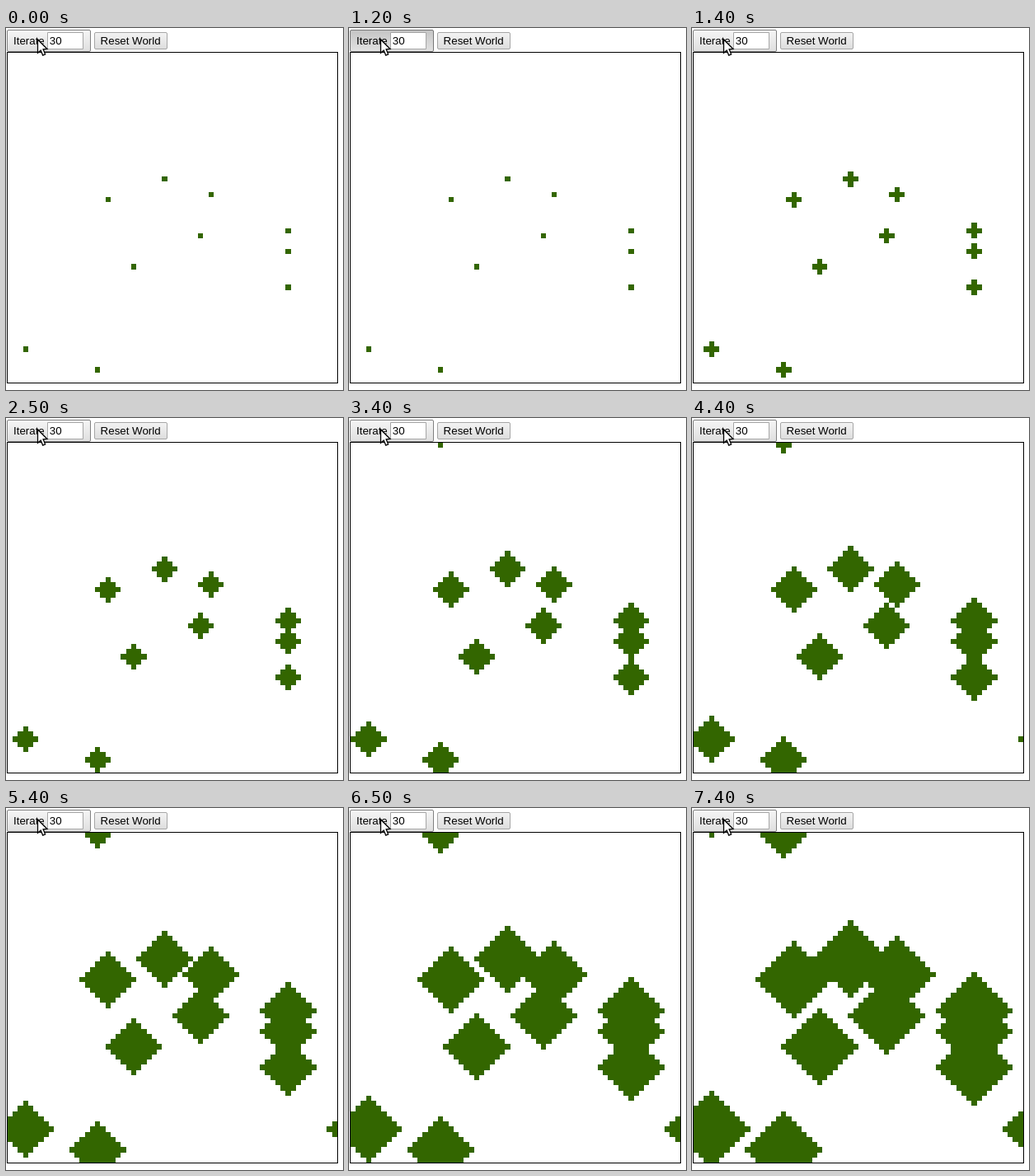
These frames come from a looping animation (409 by 439 pixels, 8000 ms). An HTML page with a canvas:

```html
<!DOCTYPE html>
<html>
<head>
<meta charset="utf-8">
<style>
html, body { margin: 0; width: 100%; height: 100%; overflow: hidden; background: #fff; }
canvas { display: block; }
</style>
</head>
<body>
<canvas id="stage" width="409" height="439"></canvas>
<script>
const ctx = document.getElementById('stage').getContext('2d');
const LOOP = 8000, PRESS = 1200, RELEASE = 1300, FIRST_GROWTH = 1400;
const GRID = 64, CELL = 400 / GRID, LEFT = 2, TOP = 30;
const GREEN = '#336600';
// Column and row of each starting plant.
const seeds = [[30, 24], [19, 28], [39, 27], [37, 35], [24, 41],
               [54, 34], [54, 38], [54, 45], [3, 57], [17, 61]];

// One growth step per second; every fourth lands a tenth late.
const growthTime = step => FIRST_GROWTH + step * 1000 + (step % 4 === 1 ? 100 : 0);

function radiusAt(t) {
  let radius = 0;
  while (t >= growthTime(radius)) radius++;
  return radius;
}

// Cell edges snap to whole pixels: halves go left in x and down in y.
const edgeX = col => Math.ceil(LEFT + col * CELL - 0.5);
const edgeY = row => Math.floor(TOP + row * CELL + 0.5);
const wrap = n => (n + GRID) % GRID;

function drawCell(col, row) {
  const x = edgeX(col), y = edgeY(row);
  ctx.fillRect(x, y, edgeX(col + 1) - x, edgeY(row + 1) - y);
}

function drawWorld(radius) {
  ctx.strokeStyle = '#000';
  ctx.lineWidth = 1;
  ctx.strokeRect(1.5, 29.5, 401, 401);
  ctx.fillStyle = GREEN;
  for (const [col, row] of seeds) {
    for (let dy = -radius; dy <= radius; dy++) {
      const half = radius - Math.abs(dy);
      for (let dx = -half; dx <= half; dx++) drawCell(wrap(col + dx), wrap(row + dy));
    }
  }
}

function drawBox(x, y, w, h, border, top, bottom, corner = 0) {
  const fill = ctx.createLinearGradient(0, y, 0, y + h);
  fill.addColorStop(0, top);
  fill.addColorStop(1, bottom);
  ctx.beginPath();
  ctx.roundRect(x + 0.5, y + 0.5, w - 1, h - 1, corner);
  ctx.fillStyle = fill;
  ctx.fill();
  ctx.strokeStyle = border;
  ctx.lineWidth = 1;
  ctx.stroke();
}

function drawText(text, x) {
  ctx.fillStyle = '#000';
  ctx.font = '13.333px "Liberation Sans", Arial, sans-serif';
  ctx.fillText(text, x, 20);
}

function drawControls(pressed) {
  if (pressed) drawBox(1, 2, 102, 27, '#777', '#c4c4c4', '#e2e2e2', 1.5);
  else drawBox(1, 2, 102, 27, '#808080', '#f6f6f6', '#dedede', 1.5);
  drawText('Iterate', 9);
  drawBox(50, 5, 44, 21, '#a6a6a6', '#fff', '#fff');
  drawText('30', 52.8);
  drawBox(107, 5, 89, 21, '#a6a6a6', '#f4f4f4', '#dcdcdc', 1.5);
  drawText('Reset World', 114.6);
}

// An arrow symmetric about its own axis, tilted so its left edge is upright.
function drawPointer() {
  const side = [[6.2, 15], [1.6, 13.4], [1.6, 20]];
  const mirrored = side.map(([x, y]) => [-x, y]).reverse();
  ctx.save();
  ctx.translate(38.5, 14);
  ctx.rotate(-Math.PI / 8);
  ctx.beginPath();
  ctx.moveTo(0, 0);
  for (const [x, y] of [...side, ...mirrored]) ctx.lineTo(x, y);
  ctx.closePath();
  ctx.fillStyle = '#fff';
  ctx.fill();
  ctx.strokeStyle = '#000';
  ctx.lineWidth = 1.3;
  ctx.stroke();
  ctx.restore();
}

function draw(now) {
  const t = now % LOOP;
  ctx.fillStyle = '#fff';
  ctx.fillRect(0, 0, 409, 439);
  drawWorld(radiusAt(t));
  drawControls(t >= PRESS && t < RELEASE);
  drawPointer();
}

const start = performance.now();
function tick() {
  draw(performance.now() - start);
  requestAnimationFrame(tick);
}
tick();
</script>
</body>
</html>
```
